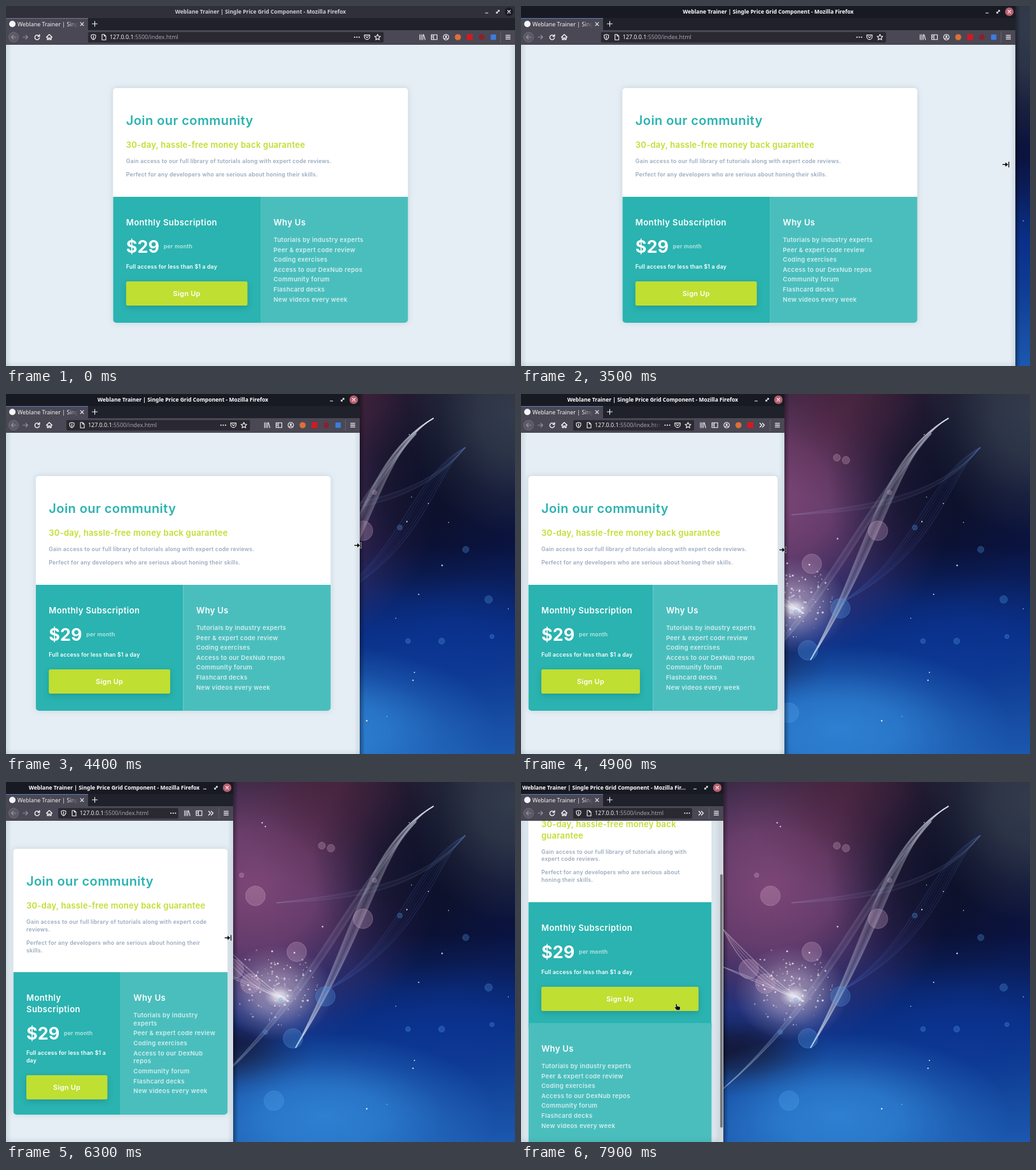
Animation, 800 px wide and 566 px high, one loop 8000 ms. Source, as an HTML page:

```html
<!DOCTYPE html>
<html lang="en">
<head>
<meta charset="utf-8">
<title>Price grid resize</title>
<style>
html, body { margin: 0; width: 100%; height: 100%; overflow: hidden; background: #1c1c30; }
svg { display: block; width: 800px; height: 566px; }
text { white-space: pre; }
.ui { font-family: "Noto Sans", "Open Sans", sans-serif; }
.pg { font-family: Inter, Roboto, sans-serif; font-weight: 600; }
.ic { fill: none; stroke: #f4f4f6; stroke-width: 1.1; stroke-linecap: round; stroke-linejoin: round; }
.bold { stroke-width: 1.4; }
.dim { stroke: #96949f; }
.card { filter: drop-shadow(0 0 5px rgba(30, 70, 90, .17)); }
.btn { filter: drop-shadow(0 3px 5px rgba(0, 50, 50, .2)); }
</style>
</head>
<body>
<svg viewBox="0 0 800 566" xmlns="http://www.w3.org/2000/svg">
  <defs>
    <linearGradient id="sky" x2="0" y2="1">
      <stop offset="0" stop-color="#1d1c30"/><stop offset=".42" stop-color="#0a1340"/>
      <stop offset=".66" stop-color="#0a2f85"/><stop offset="1" stop-color="#1b58ae"/>
    </linearGradient>
    <g id="fades"></g>
  </defs>
  <g id="wall"></g>
  <g id="win"></g>
  <g id="cursor"></g>
</svg>
<script>
const $ = id => document.getElementById(id);
const LOOP = 8000, STEP = 100;
const clamp = v => Math.min(1, Math.max(0, v));
const lerp = (a, b, k) => a + (b - a) * k;
const span = (t, a, b) => clamp((t - a) / (b - a));
const smooth = k => k * k * (3 - 2 * k);

// Linear path through [time, value] points
function path(keys, t) {
  let v = keys[0][1];
  for (let i = 1; i < keys.length; i++) {
    v = lerp(v, keys[i][1], span(t, keys[i - 1][0], keys[i][0]));
  }
  return v;
}

const rect = (x, y, w, h, fill, more = '') =>
  `<rect x="${x}" y="${y}" width="${w}" height="${h}" fill="${fill}" ${more}/>`;
const dot = (x, y, r, fill, more = '') =>
  `<circle cx="${x}" cy="${y}" r="${r}" fill="${fill}" ${more}/>`;
const icon = (x, y, d, look = '') =>
  `<path class="ic ${look}" transform="translate(${x} ${y})" d="${d}"/>`;
const ui = (x, y, s, size, fill, more = '') =>
  `<text class="ui" x="${x}" y="${y}" font-size="${size}" fill="${fill}" ${more}>${s}</text>`;
const page = (x, y, s, size, gap, fill, more = '') =>
  `<text class="pg" x="${x}" y="${y}" font-size="${size}" letter-spacing="${gap}" fill="${fill}" ${more}>${s}</text>`;

const fade = (id, color, from, to, dir = '') =>
  `<linearGradient id="${id}" ${dir}><stop stop-color="${color}" stop-opacity="${from}"/>
   <stop offset="1" stop-color="${color}" stop-opacity="${to}"/></linearGradient>`;

/* ---------- wallpaper ---------- */

function seeded(seed) {
  return () => (seed = (seed * 16807) % 2147483647) / 2147483647;
}

function glow(x, y, rx, ry, color, alpha) {
  const id = `glow${x}-${y}`;
  const stop = (o, a) => `<stop offset="${o}" stop-color="${color}" stop-opacity="${alpha * a}"/>`;
  return `<radialGradient id="${id}">${stop(0, 1)}${stop(.35, .8)}${stop(.7, .28)}${stop(1, 0)}</radialGradient>
    <ellipse cx="${x}" cy="${y}" rx="${rx}" ry="${ry}" fill="url(#${id})"/>`;
}

// Strands share both ends of a cubic curve and spread by (dx, dy) between them
function ribbon([x0, y0, x1, y1, x2, y2, x3, y3], dx, dy, n, color, alpha) {
  let out = '';
  for (let i = 0; i <= n; i++) {
    const k = i / n, a = alpha * (.6 + Math.abs(2 * k - 1));
    out += `<path d="M${x0},${y0}C${x1 + dx * k},${y1 + dy * k} ${x2 + dx * k},${y2 + dy * k} ${x3},${y3}"
      fill="none" stroke="${color}" stroke-opacity="${a}" stroke-width="1.5"/>`;
  }
  return out;
}

function wallpaper() {
  const rnd = seeded(77);
  const near = (v, d) => v + (rnd() - .5) * 2 * d;
  let s = rect(0, 0, 800, 566, 'url(#sky)');
  s += glow(390, 165, 290, 260, '#82497a', .95);
  s += glow(520, 10, 170, 170, '#55243f', .6);
  s += glow(650, 140, 170, 190, '#0c0f24', .75);
  s += glow(800, 30, 170, 190, '#3a4654', .75);
  s += glow(335, 425, 150, 70, '#15132c', .85);
  s += glow(700, 400, 190, 120, '#0a3596', .5);
  s += glow(500, 525, 270, 130, '#3590e0', .75);
  s += glow(425, 332, 90, 75, '#e8d2e2', .55);
  s += glow(430, 337, 24, 18, '#ffffff', .7);

  s += ribbon([672, 38, 592, 85, 577, 230, 455, 418], -30, 15, 20, '#dfe3ee', .12);
  s += ribbon([645, 62, 555, 165, 490, 340, 318, 482], -22, 8, 9, '#c3cbe4', .09);
  s += ribbon([318, 232, 360, 275, 400, 315, 445, 345], -15, 12, 3, '#ffffff', .2);
  s += ribbon([318, 291, 360, 305, 400, 325, 440, 340], 0, 5, 2, '#ffffff', .15);
  s += ribbon([425, 190, 540, 175, 650, 165, 722, 84], 0, 10, 4, '#a8b4dc', .07);
  s += ribbon([722, 84, 670, 130, 660, 250, 500, 330], -35, 0, 6, '#4a6cbc', .13);

  const bubble = (x, y, r) => {
    const c = y > 325 || x > 600 ? '#5aa8f0' : '#d9b3d0';
    return dot(x, y, r, c, `fill-opacity=".27" stroke="${c}" stroke-opacity=".35" stroke-width=".8"`);
  };
  const large = [[392, 179], [457, 267], [358, 294], [384, 317], [561, 215], [502, 337], [451, 403], [421, 501]];
  for (const [x, y] of large) s += bubble(x, y, 15.5);
  for (let i = 0; i < 12; i++) s += bubble(near(570, 200), near(310, 220), 3 + 3 * rnd());
  for (let i = 0; i < 16; i++) s += dot(near(570, 220), near(290, 230), .7 + rnd() * .6, '#fff', 'opacity=".85"');
  for (let i = 0; i < 110; i++) {
    const a = rnd() * 2 * Math.PI, d = 65 * Math.pow(rnd(), .8);
    s += dot(425 + d * Math.cos(a), 320 + d * Math.sin(a), .5 + rnd() * 1.2, '#fff4fa', `opacity="${.3 + rnd() * .5}"`);
  }
  return s;
}

/* ---------- browser frame ---------- */

const TITLE = 'Weblane Trainer | Single Price Grid Component - Mozilla Firefox';
const BAR = '#4a4854', FIELD = '#2a2932', INK = '#f4f4f6', GAP = 18.6;
const TOOLS = [
  x => icon(x, 49, 'M-4,-4v8M-1.6,-4v8M.8,-4v8M2,-4l2.4,8'),
  x => icon(x, 49, 'M-4.5,-3.8h9v7.6h-9zM-1,-3.8v7.6M-3.2,-1.5h.8M-3.2,.5h.8'),
  x => icon(x, 49, 'M-4.3,0a4.3,4.3 0 1 0 8.6,0a4.3,4.3 0 1 0 -8.6,0M-2.6,2.6q2.6,-3 5.2,0') + dot(x, 47.7, 1.5, INK),
  x => dot(x, 49, 4.8, '#dc7038'),
  x => rect(x - 4.7, 44.3, 9.4, 9.4, '#cf1b22', 'rx="1"'),
  x => dot(x, 49, 4.4, '#8e1f2a'),
  x => rect(x - 4.2, 44.8, 8.4, 8.4, '#3b7de0', 'rx="1"')
];

function titleBar(W, active) {
  const half = 136, maxEnd = W - 51;
  const color = active ? '#ffffff' : '#cfcfd6', look = 'font-weight="700"';
  let s = rect(0, 0, W, 19, active ? '#181a23' : '#2f303a');
  if (maxEnd - 2 * half < 2) {
    const keep = Math.floor((W - 58.5) / 4.39);
    s += ui(2, 12, TITLE.slice(0, keep) + '...', 8.5, color, look);
  } else {
    s += ui(Math.min(W / 2, maxEnd - half), 12, TITLE, 8.5, color, look + ' text-anchor="middle"');
  }
  return s + icon(W - 44.5, 11, 'M-2,0h4') +
    icon(W - 27, 9, 'M.4,-2.2h1.8v1.8M-.4,2.2h-1.8v-1.8M-1.5,1.5l3,-3') +
    dot(W - 9.5, 9, 6.7, active ? '#b9606f' : '#1b1c24') +
    icon(W - 9.5, 9, 'M-2,-2l4,4M2,-2l-4,4', 'bold');
}

function tabStrip(W, active) {
  return rect(0, 19, W, 19, '#1f222b') + rect(0, 19, 129, 19, BAR) +
    rect(0, 19, 129, 1, active ? '#5b7fb8' : '#77758f') +
    dot(10, 28.3, 5, '#f3f5f8') + ui(18, 31.6, TITLE.slice(0, 22), 8.9, INK) +
    rect(98, 21, 15, 16, 'url(#tabFade)') + rect(113, 21, 15, 16, BAR) +
    icon(119.5, 28.3, 'M-2.5,-2.5l5,5M2.5,-2.5l-5,5') + icon(139.5, 28, 'M-4,0h8M0,-4v8');
}

function toolbar(W) {
  const all = W >= 417, roomy = W > 395;
  const n = all ? TOOLS.length : Math.max(0, Math.floor((W - 306) / GAP));
  const first = W - (all ? 34 - GAP : 35) - GAP * n;
  const gap = Math.max(14, 27 + (W - 556) * .139);
  const L = 68 + gap, R = first - gap, dots = R - (roomy ? 42 : 8);

  let s = rect(0, 38, W, 23, BAR) +
    dot(12, 49, 7.7, '#5b5966', 'stroke="#74727f" stroke-width=".8"') +
    icon(12, 49, 'M3.5,0h-7M-.5,-3l-3,3 3,3', 'dim') +
    icon(30.5, 49, 'M-3.8,0h7.4M.6,-3l3,3 -3,3', 'dim') +
    icon(49, 49, 'M3.2,-1.6a3.7,3.7 0 1 0 .4,2.8M3.8,-4v2.8h-2.8', 'bold') +
    icon(68, 49, 'M-4.4,0L0,-4.2 4.4,0M-3,-.8v4.6h2v-2.6h2v2.6h2v-4.6', 'bold');

  s += rect(L, 41, R - L, 16.5, FIELD, 'rx="2"') +
    icon(L + 8.5, 49, 'M0,-4.2l3.5,1v2.5q0,3 -3.5,4.8q-3.5,-1.8 -3.5,-4.8v-2.5zM0,-2v4') +
    icon(L + 25, 49, 'M-3,-4.2h3.5l2.5,2.5v5.9h-6zM.5,-4.2v2.5h2.5') +
    ui(L + 34, 52.3, '127.0.0.1<tspan fill="#a5a4ae">:5500/index.html</tspan>', 8.9, INK) +
    rect(dots - 22, 42, 12, 15, 'url(#urlFade)') + rect(dots - 10, 42, R - dots + 9, 15, FIELD);
  for (let i = -1; i <= 1; i++) s += dot(dots + 3.6 * i, 49, 1.05, INK);
  if (roomy) {
    s += icon(R - 26, 49, 'M-4.2,-3.4h8.4v2.8a4.2,4.2 0 0 1 -8.4,0zM-2,-1.2l2,2 2,-2');
    s += icon(R - 9.5, 49, 'M0,-4.5L1.3,-1.5 4.5,-1.2 2.1,1 2.8,4.2 0,2.5 -2.8,4.2 -2.1,1 -4.5,-1.2 -1.3,-1.5z');
  }
  for (let i = 0; i < n; i++) s += TOOLS[i](first + GAP * i);
  if (!all) s += icon(W - 35, 49, 'M-3.5,-3l3,3 -3,3M.5,-3l3,3 -3,3', 'bold');
  return s + rect(W - 23, 40, .8, 18, '#6a6875') +
    icon(W - 11, 49, 'M-3.3,-2.9h6.6M-3.3,0h6.6M-3.3,2.9h6.6', 'bold');
}

/* ---------- web page ---------- */

const TEAL = '#2ab3b0', SOFT = '#4abebd', LIME = '#bfdf32', GREY = '#9aaabd', PAD = 20.5;
const HEAD_LEAD = 17.5, TEXT_LEAD = 11.7, LIST_LEAD = 12.8;
const BENEFITS = [
  ['Tutorials by industry|experts', 142], ['Peer &amp; expert code review', 0], ['Coding exercises', 0],
  ['Access to our DexNub|repos', 134], ['Community forum', 0], ['Flashcard decks', 0], ['New videos every week', 0]
];

// Breaks at "|" only when the column is narrower than the whole line
const fit = (s, full, room) => room < full ? s.split('|') : [s.replace('|', ' ')];
const extra = (lines, lead) => (lines.length - 1) * lead;
const block = (x, y, lines, lead, ...style) =>
  lines.map((s, i) => page(x, y + i * lead, s, ...style)).join('');

function intro(x, y, room) {
  const h = fit('30-day, hassle-free money back|guarantee', 282, room);
  const p = room >= 284
    ? fit('Gain access to our full library of tutorials along with expert code|reviews.', 322, room)
    : ['Gain access to our full library of tutorials along with', 'expert code reviews.'];
  const q = room >= 272
    ? fit('Perfect for any developers who are serious about honing their|skills.', 299.5, room)
    : ['Perfect for any developers who are serious about', 'honing their skills.'];
  const dh = extra(h, HEAD_LEAD), dp = dh + extra(p, TEXT_LEAD);
  return {
    h: 171 + dp + extra(q, TEXT_LEAD),
    s: page(x, y + 57.6, 'Join our community', 20, .42, TEAL) +
       block(x, y + 94, h, HEAD_LEAD, 13, .24, LIME) +
       block(x, y + 118.2 + dh, p, TEXT_LEAD, 8.7, .23, GREY) +
       block(x, y + 139.2 + dp, q, TEXT_LEAD, 8.7, .23, GREY)
  };
}

function plan(x, y, room) {
  const h = fit('Monthly|Subscription', 143, room);
  const f = fit('Full access for less than $1 a|day', 144.5, room);
  const dh = extra(h, HEAD_LEAD), df = dh + extra(f, TEXT_LEAD);
  const b = Math.round(y + 133 + df);
  return {
    h: 190.3 + df,
    s: block(x, y + 45.3, h, HEAD_LEAD, 13, .42, '#fff') +
       page(x, y + 88 + dh, '$29', 27, 0, '#fff', 'style="font-weight:700"') +
       page(x + 59, y + 81 + dh, 'per month', 8.8, .2, '#fff', 'opacity=".68"') +
       block(x, y + 112.6 + dh, f, TEXT_LEAD, 8.7, .18, '#fff') +
       rect(x, b, room, 38, LIME, 'rx="2.5" class="btn"') +
       page(x + room / 2, b + 23, 'Sign Up', 11, .25, '#fff', 'text-anchor="middle"')
  };
}

function reasons(x, y, room) {
  let s = page(x, y + 45.3, 'Why Us', 13, .35, '#fff'), ly = y + 71;
  for (const [text, full] of BENEFITS) {
    const lines = fit(text, full, room);
    s += block(x, ly, lines, LIST_LEAD, 9.6, .3, '#fff', 'opacity=".76"');
    ly += 15.6 + extra(lines, LIST_LEAD);
  }
  return { h: ly - y + 17.8, s };
}

function site(W, P, scroll, hot) {
  const top = 61, view = 505;
  const single = P < 340, bar = single ? 7 : 0;
  const cw = Math.min(463.5, P - bar - 23), x = (P - bar - cw) / 2;
  const col = single ? cw : cw / 2, room = col - 2 * PAD, wide = cw - 2 * PAD;
  const introH = intro(0, 0, wide).h, planH = plan(0, 0, room).h, whyH = reasons(0, 0, room).h;
  const rowH = Math.max(planH, whyH);
  const total = Math.round(introH + (single ? planH + whyH : rowH));
  const y = Math.round(single ? top + 20 - scroll : top + (view - total) / 2);
  const y2 = Math.round(y + introH);
  const x3 = single ? x : x + col, y3 = single ? Math.round(y2 + planH) : y2;

  let s = rect(0, top, W, view, '#e6eef5') + rect(x, y, cw, total, '#fff', 'rx="5" class="card"');
  s += `<clipPath id="round">${rect(x, y, cw, total, '#fff', 'rx="5"')}</clipPath><g clip-path="url(#round)">` +
    rect(x, y2, col, rowH + 1, TEAL) + rect(x3, y3, col + 1, rowH + 1, SOFT) + '</g>';
  s += intro(x + PAD, y, wide).s + plan(x + PAD, y2, room).s + reasons(x3 + PAD, y3, room).s;
  s += rect(0, top, 9, view, 'url(#edgeL)') + rect(W - bar - 9, top, 9, view, 'url(#edgeR)') +
    rect(0, 557, W, 9, 'url(#edgeB)');
  if (single) {
    const ratio = view / (total + 40);
    s += rect(W - bar, top, bar, view, '#d2d7dc') +
      rect(W - 5, 63 + scroll * ratio, 4, view * ratio, hot ? '#77797d' : '#a9adb1', 'rx="2"');
  }
  return s;
}

/* ---------- cursor ---------- */

const CURSORS = {
  arrow: 'M0,0V10L2.4,7.8 4,11.4 5.6,10.7 4,7.2H7z',
  hand: 'M-1.2,-4.6q1,-.8 1.6,.2l.4,3 4,1q1,.4 .8,1.6l-.8,3.4h-4.6l-3.2,-4q.2,-1 1.4,-.6l.8,.6z',
  resize: 'M-5.5,-.8H-1V-3.6L3.4,0 -1,3.6V.8H-5.5zM3.7,-4.5h1.4v9h-1.4z'
};

const draw = (kind, x, y) =>
  `<path transform="translate(${x} ${y})" d="${CURSORS[kind]}" fill="#0c0c0e" stroke="#fff" stroke-width=".9" paint-order="stroke"/>`;

function pointer(t, edge) {
  if (t >= 1400 && t < 2000) {
    const k = span(t, 1400, 1900);
    return draw('arrow', lerp(445, 775, k), lerp(290, 265, k));
  }
  if (t >= 2600 && t < 7000) return draw('resize', edge, path([[2800, 258], [4400, 238], [4900, 245]], t));
  if (t >= 7200) {
    const k = span(t, 7200, 7400);
    return draw(k < 1 ? 'arrow' : 'hand', lerp(302, 244.5, k), lerp(238, 354, k));
  }
  return '';
}

/* ---------- timeline ---------- */

const WIDTHS = [[2800, 800], [3500, 777], [4400, 556], [4600, 546], [4900, 414], [6300, 357], [6600, 318]];
const LAG = 60; // the window trails the pointer, the page trails the window

function render(t) {
  const W = Math.round(path(WIDTHS, t)), edge = path(WIDTHS, t + LAG);
  const P = W + (W - edge) * .35;
  const scroll = 104 * smooth(span(t, 7500, 7900));
  const active = t >= 2900;
  $('win').innerHTML = rect(W, 0, 8, 566, 'url(#cast)') + site(W, P, scroll, t >= 7000) +
    titleBar(W, active) + tabStrip(W, active) + toolbar(W);
  $('cursor').innerHTML = pointer(t, edge);
}

const SHADE = '#2c5060', DOWN = 'x2="0" y2="1"';
$('fades').innerHTML = fade('edgeL', SHADE, .13, 0) + fade('edgeR', SHADE, 0, .13) +
  fade('edgeB', SHADE, 0, .08, DOWN) + fade('cast', '#000', .35, 0) +
  fade('tabFade', BAR, 0, 1) + fade('urlFade', FIELD, 0, 1);
$('wall').innerHTML = wallpaper();

const start = performance.now();
let shown = -1;
function tick() {
  const t = Math.floor(((performance.now() - start) % LOOP) / STEP) * STEP;
  if (t !== shown) render(shown = t);
  requestAnimationFrame(tick);
}
tick();
</script>
</body>
</html>
```
